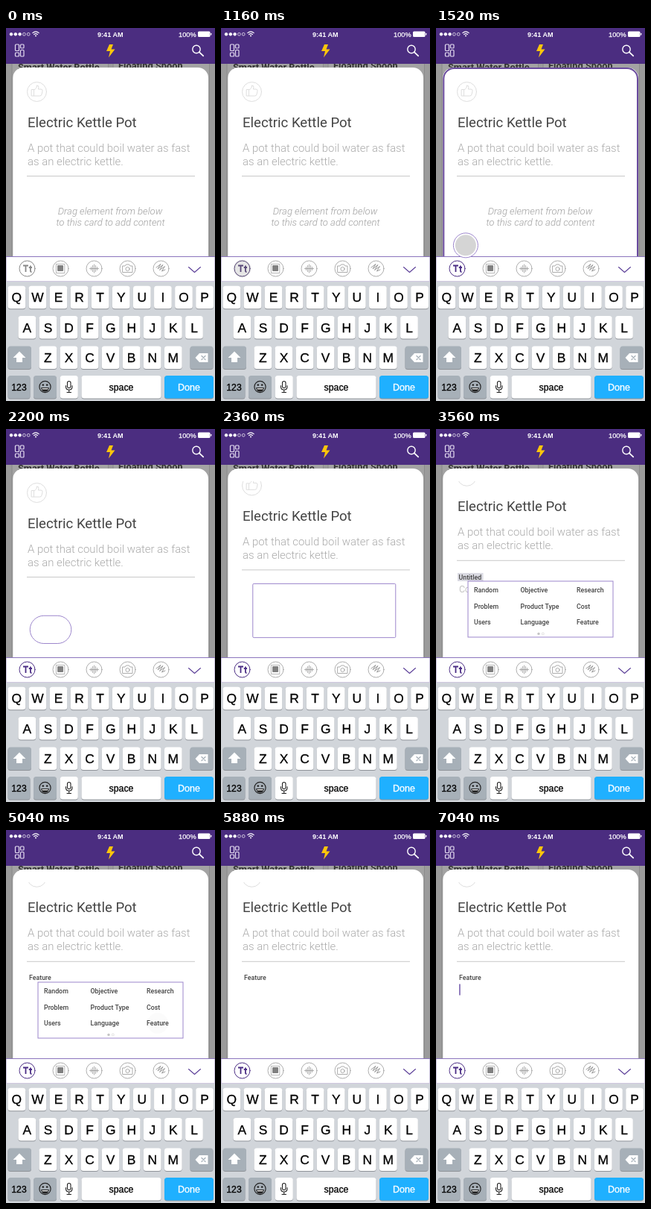
Animation, 281 px wide and 500 px high, one loop 7400 ms. Source, as an HTML page:

```html
<!DOCTYPE html>
<html lang="en">
<head>
<meta charset="utf-8">
<title>Card editor</title>
<style>
  html, body { margin: 0; width: 100%; height: 100%; overflow: hidden; background: #9b9b9b; }
  svg { display: block; width: 100vw; height: 100vh; font-family: Roboto, sans-serif; }
  .line { fill: none; stroke-linecap: round; stroke-linejoin: round; }
  .ui { font-family: "Liberation Sans", Arial, sans-serif; }
  .mid { text-anchor: middle; }
</style>
</head>
<body>
<svg viewBox="0 0 281 500">
  <defs>
    <clipPath id="page"><rect x="9" y="70" width="263" height="237"/></clipPath>
  </defs>

  <!-- dimmed board -->
  <rect width="281" height="500" fill="#9b9b9b"/>
  <path d="M8 40h129.500v270h-129.500zM144 40h129.500v270h-129.500z" fill="#a3a3a3" stroke="#8a8a8a" stroke-width=".9"/>
  <g font-size="12.800" font-weight="600" fill="#333">
    <text x="16" y="57">Smart Water Bottle</text>
    <text x="151" y="54.700">Floating Spoon</text>
  </g>

  <!-- header -->
  <rect width="281" height="48" fill="#4b2d80"/>
  <g fill="#fff" class="ui">
    <g id="signal" stroke="#fff" stroke-width=".7"></g>
    <path class="line" stroke="#fff" stroke-width="1.200" d="M35.800 6.600q4.200-3.600 8.400 0M37.500 8.600q2.500-2 5 0"/>
    <circle cx="40" cy="10.400" r="1"/>
    <text x="140.300" y="11.700" class="mid" font-size="9.100" font-weight="bold">9:41 AM</text>
    <text x="232" y="11.700" font-size="9.300" stroke="#fff" stroke-width=".25">100%</text>
    <rect x="258" y="4.500" width="16.500" height="7.500" rx="1.500"/>
    <rect x="275" y="6.700" width="1.300" height="3" rx=".6"/>
  </g>
  <g class="line" stroke="#e6def2" stroke-width="1.200">
    <rect x="12.500" y="22" width="5" height="8.500" rx="1"/>
    <rect x="12.500" y="33" width="5" height="5" rx="1"/>
    <rect x="19.500" y="22" width="4.500" height="5" rx="1"/>
    <rect x="19.500" y="29.500" width="4.500" height="8.500" rx="1"/>
  </g>
  <path d="M139 22h5l-2.500 6.500h5l-8.500 11 2-8.500h-5z" fill="#fdc60b"/>
  <g class="line" stroke="#fff" stroke-width="1.400">
    <circle cx="256" cy="28.500" r="5.200"/><path d="M259.900 32.400l5.300 5" stroke-width="1.800"/>
  </g>

  <!-- card -->
  <path d="M9.300 307V67a14 14 0 0 1 14-14H258a14 14 0 0 1 14 14V307z" fill="#fff"/>
  <path id="glow" class="line" d="M10.300 307V68a14 14 0 0 1 14-14H257a14 14 0 0 1 14 14V307" stroke="#6a4a9e" stroke-width="2"/>
  <g clip-path="url(#page)">
    <g id="content">
      <g class="line" stroke="#dedede">
        <circle cx="41.500" cy="85.500" r="13"/>
        <path d="M34.500 82.500h3v8.500h-3zM37.500 83q4-1.500 4-6 2.600-.3 2.400 2.500l-.5 2.500h3.600q2.500.2 2 2.600l-1 4.400q-.5 2-2.500 2h-8"/>
      </g>
      <text x="29" y="132.700" font-size="18.600" fill="#444">Electric Kettle Pot</text>
      <g font-size="14.900" font-weight="300" fill="#aaa">
        <text x="29" y="165.500">A pot that could boil water as fast</text>
        <text x="29" y="183.500">as an electric kettle.</text>
      </g>
      <path d="M28 198.500H254" stroke="#c8c8c8"/>
    </g>
  </g>
  <g id="hint" class="mid" font-size="13.100" font-weight="300" font-style="italic" fill="#a0a0a0">
    <text x="140" y="250">Drag element from below</text>
    <text x="140.500" y="265">to this card to add content</text>
  </g>

  <g id="field">
    <rect id="mark" x="29" y="193" width="34.500" height="11" fill="#dadae2"/>
    <g font-size="8.800" font-weight="500" fill="#444">
      <text id="untitled" x="30.500" y="201.500">Untitled</text>
      <text id="feature" x="31" y="200.500">Feature</text>
    </g>
    <text id="empty" x="31" y="219" font-size="12.500" font-weight="300" fill="#aaa">Content</text>
  </g>
  <rect id="caret1" x="63" y="191" width="1" height="13" fill="#4b2d80"/>
  <rect id="caret2" x="31.300" y="206.500" width="1.300" height="15" fill="#5a3d9c"/>

  <!-- toolbar -->
  <rect x=".5" y="306.500" width="280" height="33" fill="#fff" stroke="#cfc8e0"/>
  <path d="M0 306.500H281" stroke="#8b75bd"/>
  <g class="line" stroke="#999">
    <g id="rings" stroke-width=".8"></g>
    <rect x="67.800" y="316.500" width="11" height="12" stroke-width=".7"/>
    <rect x="70" y="318.500" width="6.500" height="7" fill="#808080" stroke="#808080"/>
    <path d="M112.500 322.500h12M114.500 320.500v4M116.500 318.500v8M118.500 317v11M120.500 318.500v8M122.500 320.500v4" stroke-width=".8"/>
    <path d="M157 319h3l1.500-2h4l1.500 2h3v8.500h-13z" stroke-width=".8"/>
    <circle cx="163.500" cy="323" r="2.600" stroke-width=".8"/>
    <path d="M202 321l6-4.500-4 6.500 7-5.500-4.500 7 7-5-4 6.500 4.500-2" stroke-width="1"/>
    <path d="M245.500 320.500l8 7 8-7" stroke="#5c3f98" stroke-width="1.100"/>
  </g>
  <g id="tool" class="line">
    <circle cx="28.500" cy="322.500" r="10.500" fill="#fff"/>
    <path d="M23 318.500h7M26.500 318.500v8.500M30.800 321h4.200M32.900 318.500v7q0 1.500 1.600 1.400" stroke-width="1.800" stroke-linecap="butt"/>
  </g>

  <!-- dragged element, later the suggestion box -->
  <rect id="box" fill="#fff" stroke="#9c86cc"/>
  <g id="choices" font-size="8.800" font-weight="500" fill="#444"></g>
  <g id="pager">
    <circle cx="138" cy="274.500" r="1.700" fill="#c4c4c4"/>
    <circle cx="143.800" cy="274.500" r="1.500" fill="#fff" stroke="#d5d5d5" stroke-width=".7"/>
  </g>
  <circle id="touch" fill="#000"/>

  <!-- keyboard -->
  <rect y="340" width="281" height="160" fill="#d1d5da"/>
  <g id="keys" class="ui mid" stroke-width=".3"></g>
  <path d="M18 433.500l8.500 8.500h-4.500v6h-8v-6h-4.500z" fill="#fff"/>
  <path d="M254.500 442l5.500-6h11.500v12h-11.500z" fill="#fff"/>
  <path class="line" d="M263 439.500l5 5m0-5l-5 5" stroke="#a7b0b8" stroke-width="1.300"/>
  <g fill="#222">
    <circle cx="52.500" cy="481" r="7.600" fill="none" stroke="#222" stroke-width="1.200"/>
    <path d="M47 482h11q-.8 5.500-5.500 5.500t-5.500-5.500z"/>
    <path d="M48.500 483h8v1.300h-8z" fill="#fff"/>
    <circle cx="49.800" cy="478.500" r="1.300"/><circle cx="55.200" cy="478.500" r="1.300"/>
  </g>
  <g class="line" stroke="#222" stroke-width="1.100">
    <rect x="82.500" y="473.500" width="4.500" height="9" rx="2.250"/>
    <path d="M80.500 479.500v1.500q0 4 4.250 4t4.250-4v-1.500M84.750 485v3M82 488.500h5.500"/>
  </g>
</svg>

<script>
const el = id => document.getElementById(id);
const add = (id, markup) => el(id).insertAdjacentHTML('beforeend', markup);
const set = (id, attrs) => { for (const k in attrs) el(id).setAttribute(k, attrs[k]); };
const fade = (id, o) => set(id, { opacity: o });

for (let i = 0; i < 5; i++)
  add('signal', `<circle cx="${7 + i * 5.8}" cy="8.3" r="1.9" fill="${i < 3 ? '#fff' : 'none'}"/>`);
for (let x = 73.5; x < 210; x += 45)
  add('rings', `<circle cx="${x}" cy="322.5" r="10.5"/>`);

const words = [['Random', 'Objective', 'Research'], ['Problem', 'Product Type', 'Cost'], ['Users', 'Language', 'Feature']];
words.forEach((row, r) => row.forEach((word, c) =>
  add('choices', `<text x="${[51, 113.5, 189][c]}" y="${219 + r * 21.7}">${word}</text>`)));

function key(x, y, w, label = '', size = 12.3, fill = '#fff', ink = '#000') {
  add('keys', `<rect x="${x}" y="${y + 1}" width="${w}" height="30.5" rx="3.5" fill="#8f9399"/>
    <rect x="${x}" y="${y}" width="${w}" height="30.5" rx="3.5" fill="${fill}"/>
    <text x="${x + w / 2}" y="${y + 15.3 + size * .36}" font-size="${size}" fill="${ink}" stroke="${ink}">${label}</text>`);
}
['QWERTYUIOP', 'ASDFGHJKL', 'ZXCVBNM'].forEach((row, r) => [...row].forEach((ch, i) =>
  key([2.5, 16.5, 44.5][r] + i * 28.08, 345.8 + r * 40.3, 23.7, ch, 17.4)));
const grey = '#a7b0b8';
key(2.5, 426.4, 31.5, '', 12, grey);
key(247.5, 426.4, 31, '', 12, grey);
key(2.5, 466, 30, '123', 12.2, grey);
key(37, 466, 31, '', 12, grey);
key(72.8, 466, 24);
key(101.5, 466, 107, 'space');
key(213, 466, 66, 'Done', 12.5, '#1fb0ff', '#fff');

const mix = (a, b, p) => a + (b - a) * p;
const prog = (t, a, b) => Math.min(1, Math.max(0, (t - a) / (b - a)));
const sine = p => .5 - .5 * Math.cos(Math.PI * p);
const quad = p => p < .5 ? 2 * p * p : 1 - 2 * (1 - p) ** 2;
const out = p => 1 - (1 - p) ** 2;
// caret: flips at every listed time, starting hidden
const blink = (t, times) => times.filter(x => t >= x).length % 2;

function draw(t) {
  const press = prog(t, 1040, 1240);
  const release = prog(t, 1820, 2000);
  const drag = sine(prog(t, 1360, 1640));
  const widen = quad(prog(t, 2135, 2385));
  const rise = quad(prog(t, 2140, 2410));
  const pick = prog(t, 4840, 4960);
  const open = t < 5080 ? 1 : 0;

  fade('glow', prog(t, 1240, 1440) * (1 - release));
  fade('hint', 1 - prog(t, 1860, 2080));
  set('content', { transform: `translate(0 ${-22.2 * quad(prog(t, 2240, 2500))})` });
  set('tool', { stroke: `rgb(${mix(136, 75, press)},${mix(136, 45, press)},${mix(136, 133, press)})` });

  // round chip follows the finger, then widens into the box
  const w = mix(33, 195, widen), h = mix(33, 75, rise);
  const cx = mix(mix(28.5, 47, drag), 140.5, widen);
  const cy = mix(mix(322.5, 272, drag), 241.5, rise);
  set('box', {
    x: cx - w / 2, y: cy - h / 2, width: w, height: h,
    rx: Math.min(h / 2, 21.5 * (1 - rise)),
    opacity: t < 1360 ? 0 : open
  });

  const text = out(prog(t, 2440, 2800));
  const shown = prog(t, 2440, 2560);
  fade('choices', text * open);
  fade('pager', shown * open);
  fade('mark', shown * (1 - pick));
  fade('untitled', text * (1 - pick));
  fade('feature', pick);
  fade('empty', shown * (1 - pick));
  fade('caret1', t < 4760 ? blink(t, [3160, 3560, 3960, 4320]) : 0);
  fade('caret2', blink(t, [5480, 5880, 6280, 6640, 7040]));

  const tapped = prog(t, 4720, 4840) * (1 - prog(t, 4880, 5060));
  set('touch', t > 4700
    ? { cx: 204, cy: 259, r: 14, opacity: .16 * tapped }
    : { cx, cy, r: mix(8, 14, press), opacity: .165 * press * (1 - release) });
}

function loop(now) {
  draw(now % 7400);
  requestAnimationFrame(loop);
}
draw(0);
requestAnimationFrame(loop);
</script>
</body>
</html>
```
